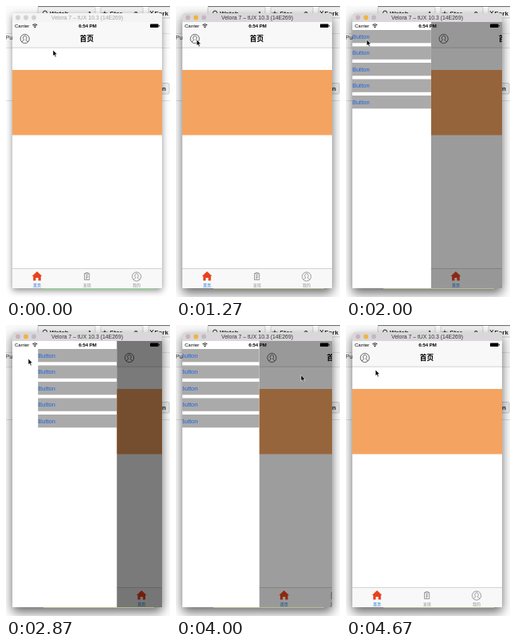
An HTML page that plays this animation: 206 by 364 pixels, repeating every 4.73 s.

```html
<!DOCTYPE html>
<html lang="zh">
<head>
<meta charset="utf-8">
<style>
html, body { margin: 0; width: 100%; height: 100%; overflow: hidden; background: #fff }
svg { display: block; width: 206px; height: 364px; font-family: "Liberation Sans", "Noto Sans CJK SC", "Noto Sans CJK", sans-serif }
.mid { text-anchor: middle }
.bold { font-weight: bold }
.frame { filter: drop-shadow(0 3px 4px rgba(0, 0, 0, .45)) }
.active .frame { filter: drop-shadow(0 6px 7px rgba(0, 0, 0, .6)) }
.title { fill: #a3a3a3 }
.active .title { fill: #333 }
.bar { fill: #f4f4f4 }
.active .bar { fill: #dad7da }
.light { fill: #d2d2d2 }
.active .light { fill: var(--c) }
.edge { fill: #86dd86 }
.active .edge { fill: #b3bf95 }
.tab { font-size: 5px; fill: #929292; text-anchor: middle }
</style>
</head>
<body>
<svg id="stage" viewBox="0 0 206 364">
  <defs>
    <clipPath id="screen"><rect x="8" y="20" width="188" height="333"/></clipPath>
    <g id="person" fill="none" stroke-width=".8">
      <circle r="5.6"/>
      <path d="M-3.8 4C-3.4 2.4-1.2 2.4-1.2 1.2C-3-.8-2.2-3.7 0-3.7S3-.8 1.2 1.2C1.2 2.4 3.4 2.4 3.8 4"/>
    </g>
  </defs>

  <!-- page behind the window -->
  <rect width="206" height="364" fill="#fff"/>
  <rect width="206" height="52" fill="#fafafa"/>
  <path d="M0 34.5H206M0 52.5H206M0 118.5H206" stroke="#e1e1e1"/>
  <g fill="#f1f1f1" stroke="#bbb" stroke-width=".7">
    <rect x="40" y="1" width="72" height="14" rx="1.5"/>
    <rect x="119" y="1" width="53" height="14" rx="1.5"/>
    <rect x="179" y="1" width="40" height="14" rx="1.5"/>
    <rect x="180" y="96.5" width="25" height="13.5" rx="1.5"/>
  </g>
  <path d="M40 .5H206" stroke="#444" stroke-width=".7"/>
  <g font-size="8" class="bold" fill="#222">
    <circle cx="49" cy="8.5" r="2.5" fill="none" stroke="#222"/>
    <text x="55" y="11.5">Watch</text><text x="103" y="11.5">1</text>
    <text x="120" y="11.5">★ Star</text><text x="161" y="11.5">0</text>
    <path d="M181 6l2 3 2-3M183 9v3" fill="none" stroke="#222"/>
    <text x="186.5" y="11.5">Fork</text>
    <text x="196" y="106">n</text>
  </g>
  <text x="-1" y="42" font-size="7.8" fill="#333">Pull</text>

  <!-- simulator window -->
  <rect class="frame" x="8" y="9" width="188" height="344" rx="2" fill="#fff"/>
  <path class="bar" d="M8 20V12q0-3 3-3H193q3 0 3 3V20z"/>
  <circle class="light" style="--c:#c9b2bc" cx="15" cy="14.5" r="2.9"/>
  <circle class="light" style="--c:#f0b43c" cx="25" cy="14.5" r="2.9"/>
  <circle class="light" style="--c:#bfb9c3" cx="35" cy="14.5" r="2.9"/>
  <text class="title mid" x="102" y="17" font-size="6.9">Velora 7 – tUX 10.3 (14E269)</text>
  <rect class="edge" x="47" y="353" width="139" height="1"/>

  <g clip-path="url(#screen)">
    <rect x="8" y="20" width="188" height="333" fill="#fff"/>
    <g id="panel">
      <g id="drawer"></g>
      <rect x="8" y="20" width="188" height="333" fill="#fff"/>
      <rect x="8" y="20" width="188" height="32" fill="#f8f8f8"/>
      <path d="M8 52.2H196M8 328.5H196" stroke="#b8b8b8" stroke-width=".6"/>
      <use href="#person" x="23.7" y="41" stroke="#444"/>
      <text class="mid bold" x="101.4" y="44.2" font-size="8.6">首页</text>
      <rect x="8" y="80" width="188" height="81.5" fill="#f4a460"/>
      <rect x="8" y="329" width="188" height="24" fill="#f8f8f8"/>
      <path d="M39 332l6.3 6h-1.5v5.5h-3.2v-3.5h-3.2v3.5h-3.2V338h-1.5z" fill="#e8421c"/>
      <path d="M100 334.5h-1.5v8h6.2v-8h-1.5M100.2 333.6h2.8v2H100.2zM100 337.6h3.2M100 339.2h3.2M100 340.8h2.4"
        fill="none" stroke="#858585" stroke-width=".8"/>
      <use href="#person" x="164" y="338.5" stroke="#858585"/>
      <text class="tab" x="39" y="351.3" style="fill:#1674d8">首页</text>
      <text class="tab" x="101.7" y="351.3">发现</text>
      <text class="tab" x="164" y="351.3">我的</text>
      <rect id="shade" x="8" y="20" width="188" height="333"/>
    </g>
    <g font-size="6">
      <text x="11" y="27.2">Carrier</text>
      <text class="mid bold" x="102.5" y="27.2">6:54 PM</text>
      <path d="M33.3 23.8q3-2.4 6 0M34.5 25.2q1.8-1.4 3.6 0" fill="none" stroke="#000" stroke-width=".9"/>
      <circle cx="36.3" cy="26.6" r=".8"/>
      <rect x="181" y="22.5" width="10.5" height="4.6" rx=".8"/>
      <rect x="192" y="24" width=".8" height="1.6"/>
    </g>
  </g>

  <path id="cursor" d="M0 0V7.6L1.7 6.1L2.9 8.9L4.2 8.3L3 5.6H5.3z" stroke="#fff" stroke-width=".6"/>
</svg>
<script>
const LOOP = 4730, OPEN = 131.25, SLIDE = 238;
const $ = id => document.getElementById(id);
const clamp = u => Math.max(0, Math.min(1, u));
const ease = u => u * u * (3 - 2 * u);
const slide = (t, start) => ease(clamp((t - start) / SLIDE));

// Buttons hang left of the main panel and travel with it.
$('drawer').innerHTML = [0, 1, 2, 3, 4].map(i => {
  const y = 30 + i * 20.5;
  return `<rect x="-91" y="${y}" width="99" height="16.3" fill="#aaa"/>
    <text x="-91" y="${y + 10.8}" font-size="7.5" fill="#2464dc">Button</text>`;
}).join('');

// time, x, y of the pointer tip
const path = [
  [0, 59, 55], [50, 59, 55], [530, 28, 43], [730, 26, 42],
  [2800, 26, 42], [2870, 28, 42], [3330, 157, 62.5], [4260, 157, 62.5],
  [4400, 122, 62], [4670, 37, 56], [LOOP, 37, 56]
];

function pointer(t) {
  const i = path.findIndex(p => p[0] > t);
  const [a, b] = [path[i - 1], path[i]];
  const u = ease((t - a[0]) / (b[0] - a[0]));
  return [1, 2].map(k => a[k] + (b[k] - a[k]) * u);
}

function draw() {
  const t = performance.now() % LOOP;
  const open = slide(t, 1840) - slide(t, 3921);
  $('stage').classList.toggle('active', t >= 1270);
  $('panel').setAttribute('transform', `translate(${OPEN * open})`);
  $('shade').setAttribute('opacity', open * .52);
  $('cursor').setAttribute('transform', `translate(${pointer(t)})`);
  requestAnimationFrame(draw);
}
draw();
</script>
</body>
</html>
```
